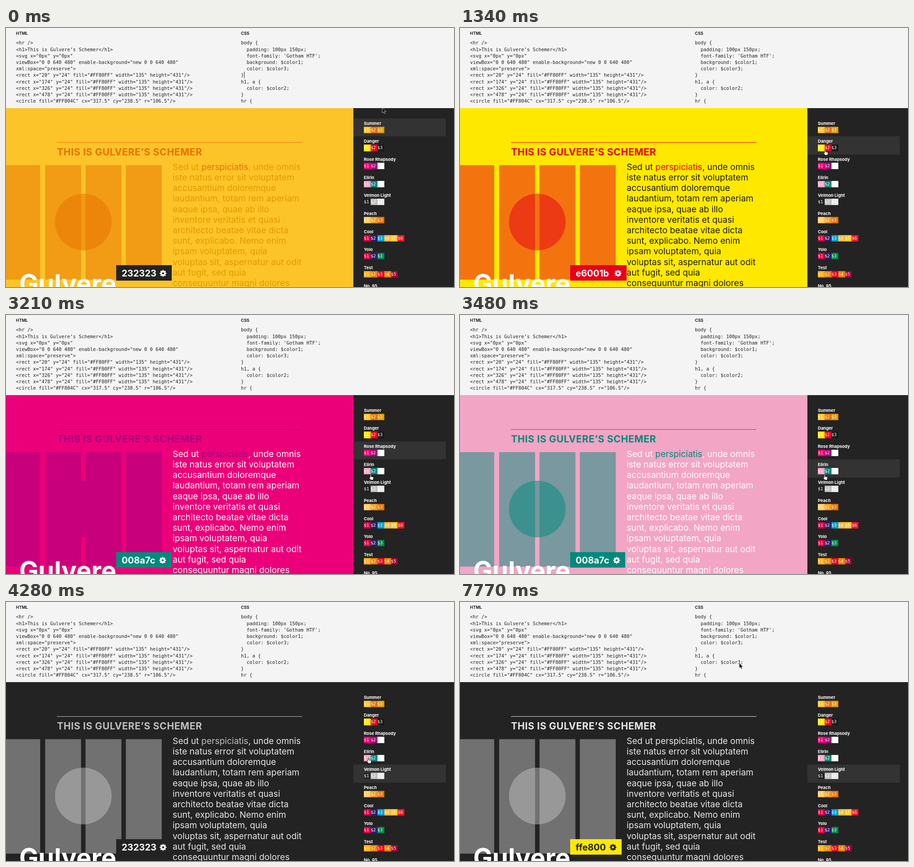
Animation, 984 px wide and 569 px high, one loop 8 s. Source, as an HTML page:

```html
<!DOCTYPE html>
<html lang="en">
<head>
<meta charset="utf-8">
<title>Colour schemer</title>
<style>
  html, body { margin: 0; width: 100%; height: 100%; overflow: hidden; }
  body { background: #f4f4f4; font-family: Inter, "Open Sans", sans-serif; }
  #stage { position: relative; width: 984px; height: 569px; overflow: hidden; }
  #stage * { box-sizing: border-box; }
  .abs, pre, h1, h4, p, .row, #stage > svg { position: absolute; margin: 0; white-space: pre; }

  h4 { top: 5.6px; font-size: 9px; line-height: 12px; color: #222; }
  pre { top: 25.4px; font: 10.4px/14.2px "DejaVu Sans Mono", monospace; color: #222; }
  #caret { width: 1px; height: 14px; background: #222; }

  #page { left: 0; top: 176px; width: 763px; height: 393px; background: var(--a); }
  #rule { left: 112px; top: 251px; width: 539px; height: 1px; background: var(--head); }
  h1 { left: 112px; top: 260.6px; font-size: 21px; line-height: 24px; letter-spacing: .58px; color: var(--head); }
  p { left: 366px; top: 293.8px; font-size: 19px; line-height: 23.2px; color: var(--c); }
  p a { color: var(--head); }
  #art { left: 0; top: 0; }
  #art rect { fill: color-mix(in srgb, var(--a), var(--b)); }
  #art circle { fill: var(--disc); opacity: var(--disc-alpha); }
  #brand { left: 29px; top: 532px; font-size: 56px; line-height: 60px; font-weight: 700; color: #fff; }

  #badge { left: 242px; top: 521px; height: 34px; padding: 1px 11px 0 12px; display: flex;
    align-items: center; justify-content: space-between; font-size: 20px; font-weight: 700; }
  #badge circle { fill: none; stroke: currentColor; }

  #side { left: 763px; top: 176px; width: 221px; height: 393px; background: #232323; color: #fff; }
  .row { left: 0; width: 202.5px; height: 39.7px; padding-left: 23px; }
  .row.on { background: #333; }
  .row b { display: block; padding-top: 5.3px; font-size: 9.3px; line-height: 12px; height: 18.2px; }
  .row div { display: flex; }
  .row i { width: 14.9px; height: 14.2px; font: normal 9.5px/13px "DejaVu Sans Mono", monospace; }
  .cursor { left: 0; top: 0; overflow: visible; stroke-linejoin: round; }
</style>
</head>
<body>
<div id="stage">
  <h4 style="left:22px">HTML</h4>
  <pre id="html" style="left:22px"></pre>
  <h4 style="left:516px">CSS</h4>
  <pre id="css" style="left:516px"></pre>
  <div id="caret" class="abs"></div>

  <div id="page" class="abs"></div>
  <div id="rule" class="abs"></div>
  <h1>THIS IS GULVERE’S SCHEMER</h1>
  <svg id="art" width="763" height="569">
    <g id="bars"></g>
    <circle cx="169.8" cy="426.3" r="62.2"/>
  </svg>
  <p>Sed ut <a>perspiciatis</a>, unde omnis
iste natus error sit voluptatem
accusantium doloremque
laudantium, totam rem aperiam
eaque ipsa, quae ab illo
inventore veritatis et quasi
architecto beatae vitae dicta
sunt, explicabo. Nemo enim
ipsam voluptatem, quia
voluptas sit, aspernatur aut odit
aut fugit, sed quia
consequuntur magni dolores</p>
  <div id="brand" class="abs">Gulvere</div>
  <div id="badge" class="abs">
    <span></span>
    <svg width="16" height="16" viewBox="-8 -8 16 16">
      <circle r="4.1" stroke-width="3.6"/>
      <circle r="6.3" stroke-width="2.4" pathLength="16" stroke-dasharray="1" stroke-dashoffset=".5"/>
    </svg>
  </div>

  <div id="side" class="abs"></div>
  <svg id="arrow" class="cursor" width="10" height="14">
    <path d="M.3 0V11.6L3 9.2 4.8 13.2 6.9 12.3 5.1 8.5H8.8Z" fill="#111" stroke="#fff" stroke-width=".6"/>
  </svg>
  <svg id="hand" class="cursor" width="12" height="14">
    <path d="M3 7V1.5a1 1 0 0 1 2 0V5l4 .8a1.5 1.5 0 0 1 1.2 1.5V9L9 12.5H4.5L1 8.5a.9.9 0 0 1 1.4-1.2z"
      fill="#fff" stroke="#1a1a1a" stroke-width=".9"/>
  </svg>
</div>
<script>
const LOOP = 8000;
const $ = id => document.getElementById(id);

const schemes = [
  ['Summer', '#fcc429 #e77200 #e39b00'],
  ['Danger', '#ffe800 #e6001b #1a1a1a'],
  ['Rose Rhapsody', '#ec0079 #a6007c #ffffff'],
  ['Elirin', '#f2a5c4 #008a7c #ffffff'],
  ['Velmon Light', '#232323 #bfbfbf #e8e8e8'],
  ['Peach', '#fdc960 #f59a13 #e77200'],
  ['Cool', '#d5003f #26226e #00a0d2 #fbb938 #fdc52a #f0142d'],
  ['Yolo', '#d8003f #26226e #008a4b'],
  ['Test', '#fbb016 #ee7d00 #e6001b #ee7d00 #a8003a'],
  ['No. 95', '']
].map(([name, list]) => ({ name, colors: list.split(' ').filter(Boolean) }));

// Each cue overrides part of the state from its time on.
const hex = (code, width, ink = '#fff') => ({ code, width, ink });
const cues = [
  [0, { scheme: 0, accent: '2', at: [826, 175], shape: 'arrow', caret: [523, 96], badge: hex('232323', 122) }],
  [270, { at: [804, 254], shape: 'hand', caret: null, badge: hex('e77200', 122) }],
  [530, { at: [798, 267], badge: hex('e6001b', 124) }],
  [1340, { scheme: 1 }],
  [1610, { at: [798, 294] }],
  [1870, { at: [798, 295] }],
  [2140, { at: [798, 307], badge: hex('a6007c', 122) }],
  [2680, { scheme: 2 }],
  [2940, { at: [796, 347], badge: hex('008a7c', 121) }],
  [3210, { at: [797, 350] }],
  [3480, { scheme: 3 }],
  [3740, { at: [792, 390], badge: hex('232323', 122) }],
  [4280, { scheme: 4, at: [792, 342] }],
  [4550, { at: [709, 172], shape: 'arrow', badge: hex('ffe800', 113, '#232323') }],
  [4810, { at: [615, 144] }],
  [5080, { at: [613, 137] }],
  [5350, { at: [613, 134] }],
  [5620, { caret: [617, 124] }],
  [6160, { accent: '', caret: [610, 124] }],
  [6430, { accent: '3', caret: [617, 124] }],
  [6700, { caret: null }],
  [7230, { caret: [617, 124] }],
  [7770, { caret: null }]
];

const bar = x => `<rect x="${x}" y="24" fill="#FF80FF" width="135" height="431"/>`;
const barXs = [20, 174, 326, 478];

$('html').textContent = [
  '<hr />', '<h1>This is Gulvere’s Schemer</h1>', '<svg x="0px" y="0px"',
  'viewBox="0 0 640 480" enable-background="new 0 0 640 480"', 'xml:space="preserve">',
  ...barXs.map(bar), '<circle fill="#FF804C" cx="317.5" cy="238.5" r="106.5"/>'
].join('\n');

const cssCode = accent => `body {
  padding: 100px 150px;
  font-family: 'Gotham HTF';
  background: $color1;
  color: $color3;
}
h1, a {
  color: $color${accent};
}
hr {`;

$('bars').innerHTML = barXs.map(x =>
  `<rect x="${x * .583 - 15.4}" y="301.3" width="78.8" height="251.5"/>`).join('');

$('side').innerHTML = schemes.map(({ name, colors }, i) =>
  `<div class="row" style="top:${22.5 + 39.65 * i}px"><b>${name}</b><div>` +
  colors.map((c, n) => `<i style="background:${c}">$${n + 1}</i>`).join('') +
  '</div></div>').join('');
const rows = [...document.querySelectorAll('.row')];

function place(el, pos) {
  el.style.visibility = pos ? 'visible' : 'hidden';
  if (pos) el.style.transform = `translate(${pos[0]}px, ${pos[1]}px)`;
}

function render({ scheme, accent, at, shape, caret, badge }) {
  const [a, b, c] = schemes[scheme].colors;
  const flatDisc = scheme === 2;
  const vars = {
    a, b, c,
    head: accent === '3' ? c : b,
    disc: flatDisc ? `color-mix(in srgb, ${a}, ${b})` : b,
    'disc-alpha': flatDisc ? 1 : .5
  };
  for (const key in vars) $('stage').style.setProperty('--' + key, vars[key]);

  rows.forEach((row, i) => row.classList.toggle('on', i === scheme));
  $('css').textContent = cssCode(accent);
  place($('caret'), caret);
  place($('arrow'), shape === 'arrow' && at);
  place($('hand'), shape === 'hand' && at);

  const el = $('badge');
  el.firstElementChild.textContent = badge.code;
  Object.assign(el.style, { background: '#' + badge.code, color: badge.ink, width: badge.width + 'px' });
}

let shown = 0;
function tick() {
  const t = performance.now() % LOOP;
  const count = cues.filter(([start]) => start <= t).length;
  if (count !== shown) {
    shown = count;
    render(Object.assign({}, ...cues.slice(0, count).map(cue => cue[1])));
  }
  requestAnimationFrame(tick);
}
tick();
</script>
</body>
</html>
```
